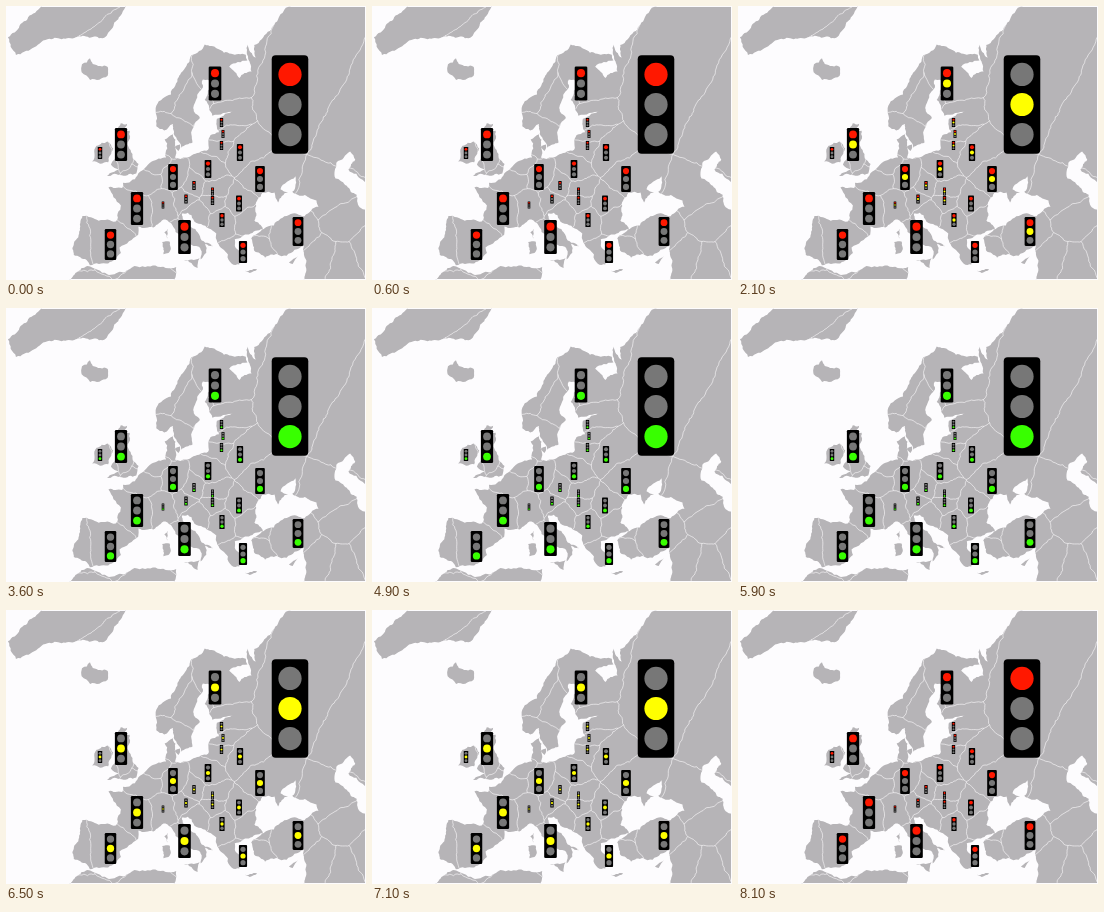
An HTML page with a canvas that plays this animation: 360 by 274 pixels, repeating every 8400 ms.

```html
<!DOCTYPE html>
<html lang="en">
<head>
<meta charset="utf-8">
<title>Traffic light sequences in Europe</title>
<style>
html, body { margin: 0; width: 360px; height: 274px; overflow: hidden; background: #fdfcfe }
canvas { display: block }
</style>
</head>
<body>
<canvas width="360" height="274"></canvas>
<script>
const W = 360, H = 274, LOOP = 8400;
const LAND = '#b6b4b7', SEA = '#fdfcfe', LAMPS = ['#ff1800', '#ffff00', '#38ff00'];
const ctx = document.querySelector('canvas').getContext('2d');

// Capes and bays as "longitude latitude"; the coast between them is generated.
const south = `-1.8 43.4,-9 43.2,-8.8 41,-9.4 38.8,-8.9 37,-6.3 36.7,-5.5 36,-2.1 36.8,.1 38.7,-.3 39.5,3.2 41.8,
  3.1 43.1,6.3 43.1,8.8 44.4,10.3 43.5,12.2 41.8,15.6 40,15.8 38,17 39,16.9 40.4,18.4 39.9,16 41.6,13.6 43.6,
  12.4 45.3,13.7 45.4,16.4 43.5,19.4 41.8,19.4 40.4,21.2 38.3,21.7 36.8,23.1 36.5,24 37.8,22.8 39.5,23 40.5,
  26 40.8,29 41.1,27.7 42.7,28.8 44.8,30.8 46.5,33.5 46,33.6 44.4,36.4 45.4,35 46.2,39.2 47.2,37.3 45.2,
  41.5 42.5,41.4 41.5,38 41,35 42,31.4 41.2,29.2 41.1,26.3 40.1,26.4 38.2,28.2 36.7,30.6 36.8,32.3 36.1,
  36 36.7,35 32.8,33.5 31.1,50 25,75 40`;
const north = `100 55,68 69,54 68.5,46 68,44 66.2,43.6 68.6,40 64.6,35 64.4,33 66.6,40.5 66.4,41 67.3,31 69.8,
  26 71,19 69.7,13 66.5,10 63.8,5.2 62,5.6 58.8,8 58.2,10.6 59.2,12.8 55.5,16 56.2,16.8 58.6,18.9 59.8,17.2 61.5,
  21.5 64.5,22 65.7,25.2 65,21.3 62.5,22.8 59.9,29.8 60,24 59.3,23.8 57.2,21.3 57,20 54.8,18 54.7,14 54,11 54,
  10.6 57.6,8.2 56.8,8.7 54,5 53.3,1.7 50.9,-1.5 49.5,-1.5 48.7,-4.7 48.4,-1.2 46`;
const islands = `-5.6 50.1,1.4 51.2,1.7 52.7,0 53.5,-2 55.8,-2 57.6,-4 57.6,-3.1 58.6,-5 58.5,-5.5 56,-3.2 54.9,
  -3 53.5,-4.5 53,-5.2 51.9,-3 51.4/-6 52.2,-5.5 54.4,-7.4 55.3,-10 54.2,-10 51.7/
  -22.7 63.9,-18.8 63.4,-13.6 65,-14.8 66.3,-20.5 65.8,-22.5 66.4,-24 65/
  12.5 38,15.6 38.2,15.1 36.7/8.2 40.9,9.7 41,9.5 39.2,8.5 39/8.6 42.4,9.4 43,9.3 41.4/
  23.6 35.5,26.3 35.2,24.8 34.9/32.4 35,34.5 35.6,33 34.6/11 55.7,12.5 56,12 55`;
const outskirts = `-44 60,-40 65,-32 68,-22 70,-20 74,-19 80,-60 80,-50 60.8/
  -5.9 35.8,-2 35.1,3 36.9,11 37,10 34,10 30,-12 30`;
const caspian = '47.2 44.2,49 46.2,53 46.5,53 45,50.6 44.3,54 39.5,51 36.8,49 38.5,49.6 40.4';

// x, y of the centre, height, habits: p = red with yellow, y = yellow alone before green, f = flashing green
const lights = [
  [284, 98.5, 98.5, 'yf'], [209, 77.5, 34, 'p'], [115, 138.5, 33, 'p'], [94, 147, 12, ''],
  [215.5, 116.5, 9, 'pf'], [217, 128, 8, 'pf'], [215.5, 139.5, 9, 'pf'], [234, 146.5, 17, 'pf'],
  [202, 163, 18, 'p'], [167, 171, 26, 'p'], [254, 173, 26, 'pf'], [188, 179.5, 9, 'p'],
  [180, 193, 9, 'pf'], [206.5, 185.5, 8, 'p'], [206.5, 194.5, 9, 'p'], [157, 199, 7, 'p'],
  [233, 197.5, 16, ''], [216, 214, 14, 'pf'], [131, 202.5, 33, ''], [104.5, 238.5, 31, ''],
  [178.5, 231, 34, ''], [237, 246, 22, ''], [292, 225.5, 29, 'p']
];
// Centres of countries without a light
const others = [
  [50, 0], [88, 62], [164, 80], [188, 92], [163, 135], [68, 243], [148, 158], [143, 172], [191, 207],
  [242, 213], [350, 130], [325, 195], [335, 213], [365, 245], [335, 258], [312, 250], [75, 290], [140, 290]
];

let seed = 7;
const random = () => (seed = seed * 16807 % 2147483647) / 2147483647;

// Lambert azimuthal equal-area projection centred on 10°E 52°N
function project(lon, lat) {
  const { sin, cos, sqrt, PI } = Math, rad = PI / 180;
  const d = (lon - 10) * rad, p = lat * rad, s0 = sin(52 * rad), c0 = cos(52 * rad);
  const k = 370 * sqrt(2 / (1 + s0 * sin(p) + c0 * cos(p) * cos(d)));
  return [165 + k * cos(p) * sin(d), 164.5 - k * (c0 * sin(p) - s0 * cos(p) * cos(d))];
}

// Midpoint displacement turns a straight line into a ragged one.
function roughLine(path, a, b, roughness) {
  const dx = b[0] - a[0], dy = b[1] - a[1], length = Math.hypot(dx, dy);
  if (length < 3) return path.lineTo(...b);
  const shift = (random() - 0.5) * Math.min(roughness, 4 / length);
  const mid = [(a[0] + b[0]) / 2 - dy * shift, (a[1] + b[1]) / 2 + dx * shift];
  roughLine(path, a, mid, roughness);
  roughLine(path, mid, b, roughness);
}

function coast(text) {
  const path = new Path2D();
  for (const shape of text.split('/')) {
    const points = shape.split(',').map(pair => project(...pair.trim().split(' ').map(Number)));
    path.moveTo(...points[0]);
    points.forEach((p, i) => roughLine(path, p, points[(i + 1) % points.length], 0.3));
    path.closePath();
  }
  return path;
}

// Each border lies halfway between neighbouring countries (Voronoi edges).
function voronoi(sites) {
  const path = new Path2D();
  sites.forEach(([ax, ay], i) => sites.slice(i + 1).forEach(([bx, by]) => {
    const mx = (ax + bx) / 2, my = (ay + by) / 2, ux = ay - by, uy = bx - ax;
    let from = -20, to = 20;
    for (const [cx, cy] of sites) {
      if (cx === ax && cy === ay || cx === bx && cy === by) continue;
      const slope = 2 * (ux * (cx - ax) + uy * (cy - ay));
      const room = (mx - cx) ** 2 + (my - cy) ** 2 - (mx - ax) ** 2 - (my - ay) ** 2;
      if (slope > 0) to = Math.min(to, room / slope);
      else if (slope < 0) from = Math.max(from, room / slope);
      else if (room < 0) to = from;
    }
    if (from >= to) return;
    const start = [mx + ux * from, my + uy * from];
    path.moveTo(...start);
    roughLine(path, start, [mx + ux * to, my + uy * to], 0.3);
  }));
  return path;
}

const land = coast([south + ',' + north, islands, outskirts].join('/'));
const lake = coast(caspian);
const borders = voronoi([...lights, ...others]);

function drawMap() {
  ctx.fillStyle = SEA;
  ctx.fillRect(0, 0, W, H);
  ctx.save();
  ctx.clip(land);
  ctx.fillStyle = LAND;
  ctx.fillRect(0, 0, W, H);
  ctx.strokeStyle = ctx.fillStyle = SEA;
  ctx.lineWidth = 0.6;
  ctx.stroke(borders);
  ctx.fill(lake);
  ctx.lineWidth = 2;
  ctx.strokeRect(0, 0, W, H);
  ctx.restore();
}

// Which of red, yellow and green are lit
function lit(t, habits) {
  if (t < 2100 || t >= 7600) return [1, 0, 0];
  if (t < 3100) return habits.includes('y') ? [0, 1, 0] : [1, habits.includes('p'), 0];
  if (t >= 6400) return [0, 1, 0];
  const dark = t >= 4600 && t < 4900 || t >= 5400 && t < 5900;
  return [0, 0, !(dark && habits.includes('f'))];
}

function drawLight(t, [x, y, h, habits]) {
  const w = h * 0.371;
  ctx.fillStyle = '#000';
  ctx.beginPath();
  ctx.roundRect(x - w / 2, y - h / 2, w, h, h * 0.04);
  ctx.fill();
  lit(t, habits).forEach((on, i) => {
    ctx.fillStyle = on ? LAMPS[i] : '#777';
    ctx.beginPath();
    ctx.arc(x, y + (i - 1) * h * 0.305, h * 0.118, 0, 7);
    ctx.fill();
  });
}

function draw() {
  const t = performance.now() % LOOP;
  drawMap();
  for (const light of lights) drawLight(t, light);
  requestAnimationFrame(draw);
}
draw();
</script>
</body>
</html>
```
